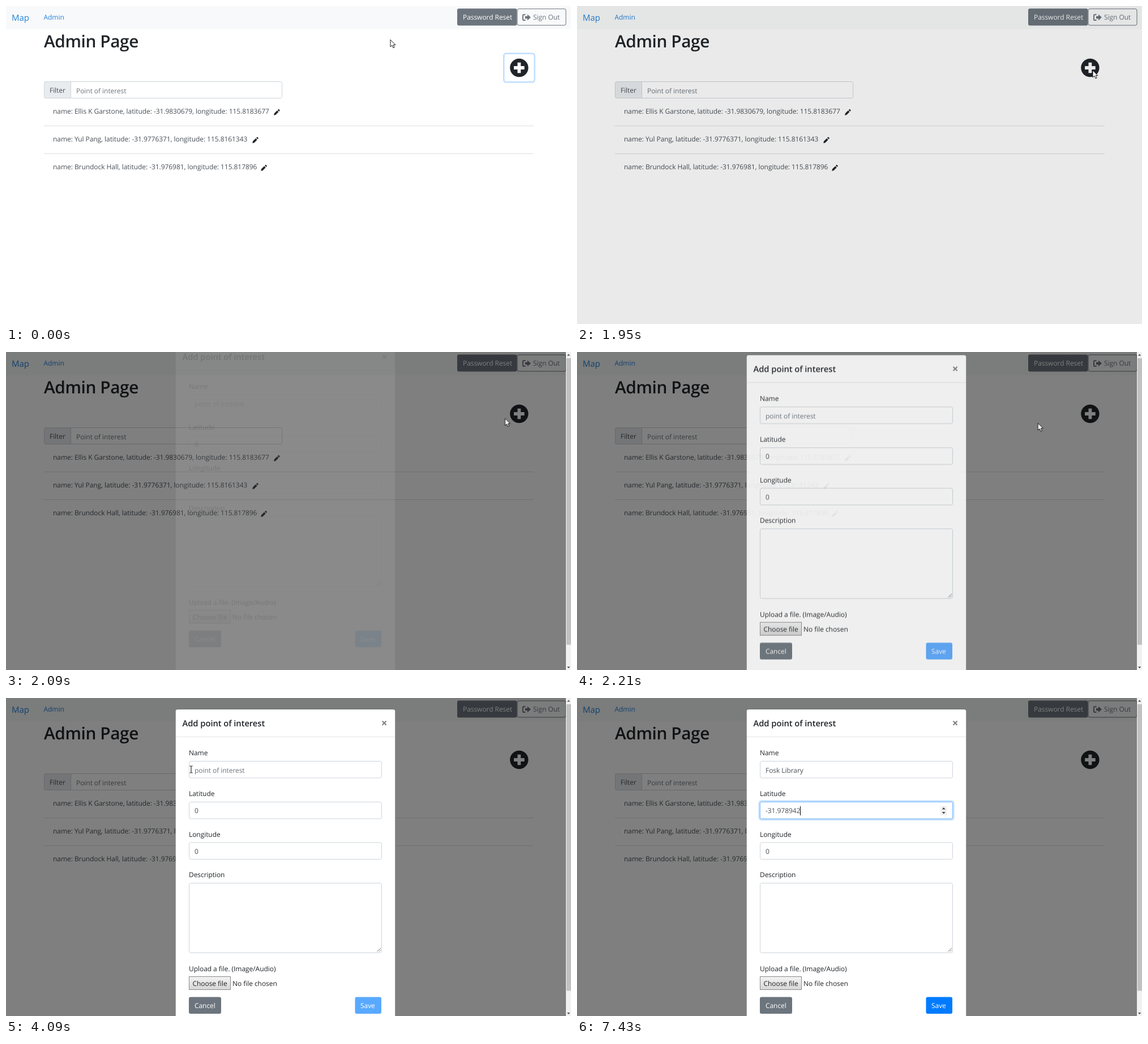
Write an HTML page that moves like this. It is 998x561 px and loops after 7990 ms.

```html
<!DOCTYPE html>
<html lang="en">
<head>
<meta charset="utf-8">
<title>Admin Page</title>
<style>
  html, body { margin: 0; width: 100%; height: 100%; overflow: hidden; background: #fff; }
  svg { display: block; width: 998px; height: 561px; }
  text {
    font: 12px "Open Sans", "Noto Sans", sans-serif;
    letter-spacing: -.005em;
    text-rendering: geometricPrecision;
    white-space: pre;
    fill: #212529;
  }
  .link { fill: #2385d9; }
  .brand { font-size: 15px; }
  .title { font-size: 29.8px; font-weight: 600; letter-spacing: -.014em; }
  .head { font-size: 14.8px; font-weight: 600; }
  .muted { fill: #6c757d; }
  .value { fill: #495057; }
  .light { fill: #fff; }
  .field { fill: #fff; stroke: #ced4da; }
  .rule { stroke: #dfdfdf; }
  .grey { fill: #6c757d; }

  .anim { animation: 7990ms linear infinite; }
  #plusRing { animation-name: plus-ring; }
  #backdrop { animation-name: backdrop; }
  #modal { animation-name: modal; }
  #bar { animation-name: bar; }
  #nameRing { animation-name: name-ring; }
  #latRing { animation-name: lat-ring; }
  #spinner { animation-name: spinner; }
  #save { animation-name: save; }
  #arrow { animation-name: arrow, arrow-seen; }
  #beam { animation-name: beam, beam-seen; }
  #arrow, #beam { animation-duration: 7990ms; animation-iteration-count: infinite; }

  @keyframes plus-ring { 0%, 19.65% { opacity: 1 } 21.5%, 100% { opacity: 0 } }
  @keyframes backdrop { 0%, 24.1% { opacity: 0 } 26%, 100% { opacity: .5 } }
  @keyframes modal {
    0%, 26% { opacity: 0; transform: translateY(-39px); animation-timing-function: cubic-bezier(0, 0, .58, 1) }
    26% { opacity: 0 }
    27.9% { opacity: 1 }
    29.75%, 100% { opacity: 1; transform: none }
  }
  @keyframes bar { 0%, 26% { visibility: hidden } 26.01%, 100% { visibility: visible } }
  @keyframes name-ring { 0%, 51.3% { opacity: 0 } 53.1%, 73.7% { opacity: 1 } 75.6%, 100% { opacity: 0 } }
  @keyframes lat-ring { 0%, 82.6% { opacity: 0 } 84.5%, 100% { opacity: 1 } }
  @keyframes spinner { 0%, 82.6% { visibility: hidden } 82.61%, 100% { visibility: visible } }
  @keyframes save { 0%, 53.9% { opacity: .65 } 55.8%, 100% { opacity: 1 } }

  @keyframes arrow {
    0%, 2% { transform: translate(679px, 59px); animation-timing-function: ease-in-out }
    11.76%, 12.64% { transform: translate(888px, 112px) }
    15.89%, 25.5% { transform: translate(911px, 113px) }
    27.66% { transform: translate(816px, 125px) }
    29.41% { transform: translate(560px, 132px) }
    31.3% { transform: translate(126px, 130px) }
    33.17%, 66.2% { transform: translate(325px, 122px) }
    66.21% { transform: translate(498px, 155px) }
    67.08% { transform: translate(256px, 115px) }
    80.9% { transform: translate(256px, 115px) }
    80.98% { transform: translate(400px, 152px) }
    82.5% { transform: translate(350px, 178px) }
    87% { transform: translate(211px, 200px) }
    90.6% { transform: translate(265px, 206px) }
    91.49%, 100% { transform: translate(265px, 212px) }
  }
  @keyframes arrow-seen {
    0%, 32.6% { visibility: visible }
    32.61%, 66.2% { visibility: hidden }
    66.21%, 67.05% { visibility: visible }
    67.06%, 80.97% { visibility: hidden }
    80.98%, 82% { visibility: visible }
    82.01%, 87% { visibility: hidden }
    87.01%, 91.8% { visibility: visible }
    91.81%, 100% { visibility: hidden }
  }
  @keyframes beam {
    0%, 60% { transform: translate(327px, 126px) }
    82%, 83.2% { transform: translate(345px, 199px) }
    87%, 100% { transform: translate(214px, 204px) }
  }
  @keyframes beam-seen {
    0%, 32.6% { visibility: hidden }
    32.61%, 53.8% { visibility: visible }
    53.81%, 82% { visibility: hidden }
    82.01%, 87% { visibility: visible }
    87.01%, 100% { visibility: hidden }
  }
</style>
</head>
<body>
<svg viewBox="0 0 998 561">
  <defs>
    <path id="pencil" fill="#212529" d="M.3 11 1 7.6 6.2 2.4 8.7 4.9 3.5 10.2ZM7 1.6 8 .6Q8.8 0 9.6.6L10.5 1.5Q11.1 2.3 10.5 3.1L9.5 4.1Z"/>
    <g id="ring" fill="none">
      <rect x="321.8" y="109.8" width="343.4" height="33" rx="4" stroke="#bfdeff" stroke-width="2.5"/>
      <rect x="323.5" y="111.5" width="340" height="29.5" rx="3" stroke="#80bdff"/>
    </g>
    <linearGradient id="chrome" x2="0" y2="1">
      <stop stop-color="#f4f4f4"/><stop offset="1" stop-color="#d6d6d6"/>
    </linearGradient>
  </defs>

  <!-- page -->
  <rect width="998" height="41" fill="#f8f9fa"/>
  <text class="link brand" x="10" y="25.5">Map</text>
  <text class="link" x="66.5" y="24">Admin</text>
  <rect class="grey" x="797" y="4.5" width="105.5" height="30" rx="3"/>
  <text class="light" x="807" y="24">Password Reset</text>
  <rect x="903" y="5" width="86" height="29" rx="3" fill="none" stroke="#6c757d"/>
  <path d="M917.5 15.2H914.6Q913 15.2 913 16.8V23.4Q913 25 914.6 25H917.5" fill="none" stroke="#6c757d" stroke-width="1.9"/>
  <path class="grey" d="M917 17.9H921V14.7L927 20.1 921 25.4V22.3H917Z"/>
  <text class="muted" x="931" y="24">Sign Out</text>
  <text class="title" x="67" y="73">Admin Page</text>

  <rect id="plusRing" class="anim" x="879.3" y="83.8" width="54.4" height="50.4" rx="4" fill="none" stroke="#bfdeff" stroke-width="2.5"/>
  <circle cx="906.4" cy="109" r="16.2" fill="#212529"/>
  <path d="M906.4 99.7V118.3M897.1 109H915.7" stroke="#fff" stroke-width="5.8"/>

  <rect class="field" x="67.5" y="133.5" width="420" height="29" rx="3"/>
  <path d="M114.5 133.5H70.5Q67.5 133.5 67.5 136.5V159.5Q67.5 162.5 70.5 162.5H114.5Z" fill="#e9ecef" stroke="#ced4da"/>
  <text class="value" x="77" y="153">Filter</text>
  <text class="muted" x="124" y="153.5">Point of interest</text>

  <text class="value" x="83" y="190">name: Ellis K Garstone, latitude: -31.9830679, longitude: 115.8183677</text>
  <text class="value" x="83" y="239">name: Yul Pang, latitude: -31.9776371, longitude: 115.8161343</text>
  <text class="value" x="83" y="288">name: Brundock Hall, latitude: -31.976981, longitude: 115.817896</text>
  <use href="#pencil" x="472.8" y="181.8"/>
  <use href="#pencil" x="435" y="231"/>
  <use href="#pencil" x="450" y="280"/>
  <path class="rule" d="M67 211.5H932M67 260.5H932"/>

  <rect id="backdrop" class="anim" width="998" height="561"/>

  <!-- dialog -->
  <g id="modal" class="anim">
    <rect x="299.5" y="20" width="388" height="600" rx="3.5" fill="#fff" stroke="#000" stroke-opacity=".2"/>
    <text class="head" x="311.5" y="50">Add point of interest</text>
    <path d="M664.6 40.8 671.6 47.8M671.6 40.8 664.6 47.8" stroke="#7f7f7f" stroke-width="2"/>
    <path d="M300 68.5H687" stroke="#e3e6e9"/>

    <text x="323" y="101">Name</text>
    <rect class="field" x="323.5" y="111.5" width="340" height="29.5" rx="3"/>
    <g id="nameRing" class="anim"><use href="#ring"/></g>
    <text id="name" x="333" y="131.5"></text>

    <text x="323" y="173">Latitude</text>
    <rect class="field" x="323.5" y="183.5" width="340" height="29.5" rx="3"/>
    <g id="latRing" class="anim"><use href="#ring" y="72"/></g>
    <rect id="mark" x="333" y="191" width="7" height="16" fill="#3297fd"/>
    <text id="lat" class="value" x="333" y="203.3"></text>
    <g id="spinner" class="anim">
      <rect x="642" y="190.5" width="11.5" height="16.5" fill="#f0f0f0"/>
      <path d="M644.7 196.5 647.7 193 650.7 196.5ZM644.7 201 647.7 204.5 650.7 201Z" fill="#444"/>
    </g>
    <rect id="caret" width="1" height="16" fill="#000"/>

    <text x="323" y="244.5">Longitude</text>
    <rect class="field" x="323.5" y="255" width="340" height="29.5" rx="3"/>
    <text class="value" x="333" y="275">0</text>

    <text x="323" y="316">Description</text>
    <rect class="field" x="323.5" y="326.5" width="340" height="123" rx="3"/>
    <path d="M655.5 447.5 662 441M659 447.5 662 444.5" stroke="#777"/>

    <text x="323" y="481.5">Upload a file. (Image/Audio)</text>
    <rect x="323.5" y="491.5" width="73" height="23" fill="url(#chrome)" stroke="#8a8a8a"/>
    <text x="329.5" y="508">Choose file</text>
    <text x="400" y="508">No file chosen</text>

    <rect class="grey" x="323" y="527.5" width="57" height="29.5" rx="3"/>
    <text class="light" x="333" y="547">Cancel</text>
    <g id="save" class="anim">
      <rect x="616.5" y="527.5" width="46.5" height="29.5" rx="3" fill="#007bff"/>
      <text class="light" x="626" y="547">Save</text>
    </g>
  </g>

  <g id="bar" class="anim">
    <rect x="989" width="9" height="561" fill="#f1f1f1"/>
    <rect x="990" y="11" width="8" height="505.5" fill="#c1c1c1"/>
    <path d="M991 6.5 993.7 3.5 996.4 6.5ZM991 555 993.7 558 996.4 555Z" fill="#505050"/>
  </g>

  <!-- pointers -->
  <path id="arrow" class="anim" d="M0 .5V13L3 10.3 5 14.9 7.1 14 5.2 9.6H8.9Z" fill="#fff" stroke="#000" stroke-width=".9"/>
  <path id="beam" class="anim" d="M-2.5-6H-.7L0-5.3.7-6H2.5M0-5.3V5.3M-2.5 6H-.7L0 5.3.7 6H2.5" fill="none" stroke="#000"/>
</svg>
<script>
  const LOOP = 7990;
  const NAME = "Fosk Library", LAT = "-31.978942";
  const [name, lat, caret, mark] = ["name", "lat", "caret", "mark"].map(id => document.getElementById(id));
  const start = performance.now();
  const within = (t, from, to) => t >= from && t < to;
  const show = (el, on) => el.setAttribute("visibility", on ? "inherit" : "hidden");

  function write(el, text) {
    if (el.textContent !== text) el.textContent = text;
  }

  function placeCaret(el, empty) {
    const end = empty ? 0 : el.getComputedTextLength();
    caret.setAttribute("x", Math.round(333 + end));
    caret.setAttribute("y", el === name ? 119 : 191);
  }

  function draw(now) {
    const t = Math.max(0, now - start) % LOOP;

    const typed = t < 4300 ? 0 : Math.ceil((t - 4299) / 490 * NAME.length);
    write(name, typed ? NAME.slice(0, typed) : "point of interest");
    name.setAttribute("class", typed ? "value" : "muted");

    const digits = t < 7300 ? 0 : 3 + 4 * Math.floor((t - 7300) / 60);
    write(lat, digits ? LAT.slice(0, digits) : "0");

    // the old value is selected by dragging left
    const selected = within(t, 6720, 7300);
    show(mark, selected);
    lat.setAttribute("class", selected ? "light" : "value");

    const inName = within(t, 4150, 5290) || within(t, 5850, 5975);
    show(caret, inName || digits);
    if (digits) placeCaret(lat, false);
    else placeCaret(name, !typed);

    requestAnimationFrame(draw);
  }
  draw(start);
</script>
</body>
</html>
```
